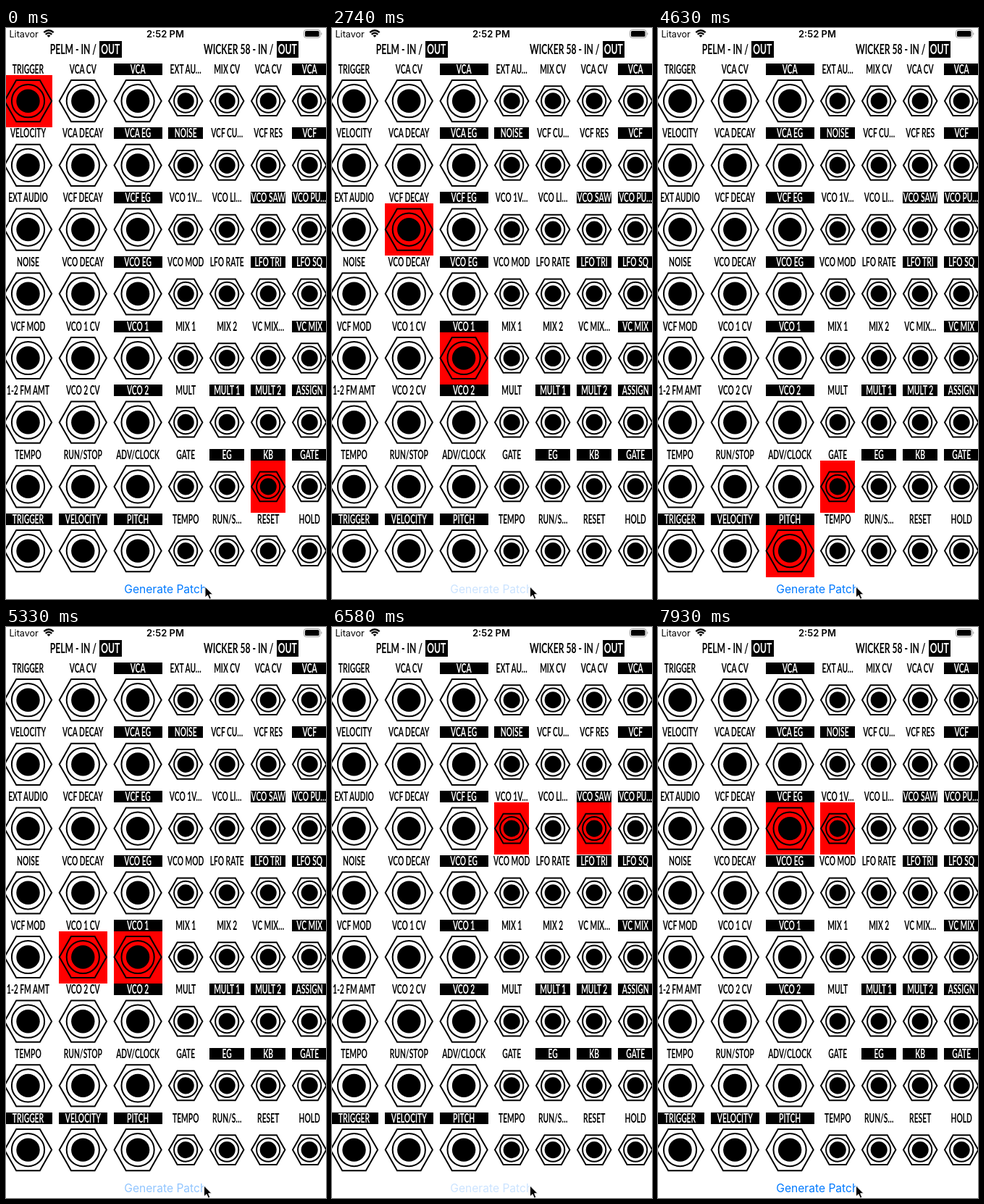
These frames come from a looping animation (442x788 px, 8 s). An HTML page:

```html
<!DOCTYPE html>
<html lang="en">
<head>
<meta charset="utf-8">
<title>Patch generator</title>
<style>
  html, body { margin: 0; width: 100%; height: 100%; overflow: hidden; background: #fff; }
  svg { display: block; width: 100%; height: 100%; }
  .ui { font-family: Inter, Roboto, sans-serif; }
  .label { font: 700 16.6px Lato, "Open Sans", sans-serif; }
  .head { font: 700 19.6px Lato, "Open Sans", sans-serif; }
  .mid { text-anchor: middle; }
  .end { text-anchor: end; }
  .line { fill: none; stroke: #000; stroke-width: 2px; vector-effect: non-scaling-stroke; }
  #panel rect { shape-rendering: crispEdges; }
</style>
</head>
<body>
<svg id="stage" viewBox="0 0 442 788">
  <defs>
    <g id="jack">
      <path class="line" d="M-32.6 0L-16.3 -28.6H16.3L32.6 0L16.3 28.6H-16.3Z"/>
      <circle class="line" r="22.6"/>
      <circle r="16.2"/>
    </g>
  </defs>
  <g class="ui">
    <text x="4.5" y="13" font-size="12.6">Litavor</text>
    <text x="220" y="13" font-size="13" font-weight="600" class="mid">2:52 PM</text>
    <g fill="none" stroke="#000" stroke-width="2.3">
      <path d="M52.3 6.2Q59 .2 65.7 6.2M54.7 8.8Q59 5 63.3 8.8"/>
      <path d="M59 13L56.6 10.4Q59 8.6 61.4 10.4Z" fill="#000" stroke="none"/>
    </g>
    <rect x="411.5" y="2.5" width="22.5" height="11" rx="3" fill="none" stroke="#999"/>
    <rect x="413" y="4" width="19.5" height="8" rx="1.6"/>
    <path d="M435.3 6Q437.6 8 435.3 10Z" fill="#999"/>
  </g>
  <g id="panel"></g>
  <text id="button" class="ui" x="163.3" y="780" font-size="15.6" fill="#007aff">Generate Patch</text>
  <path id="cursor" d="M0 0V15L3.5 11.8L5.9 17.2L8.4 16.1L6.1 10.8H10.7Z" stroke="#fff" stroke-width="1"/>
</svg>
<script>
const LOOP = 8000, CONDENSE = 0.62, TOP = 64.7, ROW = 88.7;

// A leading * marks an output
const rows = [
  "TRIGGER|VCA CV|*VCA|EXT AU…|MIX CV|VCA CV|*VCA",
  "VELOCITY|VCA DECAY|*VCA EG|*NOISE|VCF CU…|VCF RES|*VCF",
  "EXT AUDIO|VCF DECAY|*VCF EG|VCO 1V…|VCO LI…|*VCO SAW|*VCO PU…",
  "NOISE|VCO DECAY|*VCO EG|VCO MOD|LFO RATE|*LFO TRI|*LFO SQ",
  "VCF MOD|VCO 1 CV|*VCO 1|MIX 1|MIX 2|VC MIX…|*VC MIX",
  "1-2 FM AMT|VCO 2 CV|*VCO 2|MULT|*MULT 1|*MULT 2|*ASSIGN",
  "TEMPO|RUN/STOP|ADV/CLOCK|GATE|*EG|*KB|*GATE",
  "*TRIGGER|*VELOCITY|*PITCH|TEMPO|RUN/S…|RESET|HOLD"
];

// press time, release time, the two jacks lit on release (row, column)
const clicks = [
  [510, 930, "01", "66"],
  [1620, 1860, "10", "12"],
  [2510, 2740, "21", "42"],
  [3280, 3580, "00", "02"],
  [4100, 4330, "63", "72"],
  [4920, 5220, "41", "42"],
  [5750, 5990, "23", "25"],
  [6580, 6880, "12", "63"],
  [7460, 7640, "22", "23"]
];
const startPair = ["00", "65"];

const $ = id => document.getElementById(id);

function text(str, x, y, cls, fill = "#000") {
  return `<text class="${cls}" fill="${fill}" transform="translate(${x} ${y}) scale(${CONDENSE} 1)">${str}</text>`;
}

function box(x, y, w, h, attrs = "") {
  return `<rect x="${x}" y="${y}" width="${w}" height="${h}" ${attrs}/>`;
}

function cell(name, r, c) {
  const big = c < 3;
  const w = big ? 67 : 48;
  const x = big ? -3 + 75.8 * c : 224.2 + 57 * (c - 3);
  const y = TOP + ROW * r, mid = x + w / 2;
  const out = name[0] === "*";
  return (out ? box(x, y - 16, w, 16) : "")
    + text(out ? name.slice(1) : name, mid, y - 2, "label mid", out ? "#fff" : "#000")
    + box(x, y, w, 72, `id="lit${r}${c}" fill="#f00" visibility="hidden"`)
    + `<use href="#jack" transform="translate(${mid} ${y + 36}) scale(${big ? 1 : 0.712})"/>`;
}

function heading(name, x) {
  return text(name + " - IN /", x, 36.3, "head end")
    + box(x + 4, 18, 30.5, 23)
    + text("OUT", x + 19.2, 36.3, "head mid", "#fff");
}

$("panel").innerHTML = heading("PELM", 125) + heading("WICKER 58", 369.5)
  + rows.map((line, r) => line.split("|").map((name, c) => cell(name, r, c)).join("")).join("");

let lit = [];
function light(pair) {
  if (pair.join() === lit.join()) return;
  lit.forEach(id => $("lit" + id).setAttribute("visibility", "hidden"));
  pair.forEach(id => $("lit" + id).setAttribute("visibility", "visible"));
  lit = pair;
}

function draw(t) {
  let pair = startPair, alpha = 1;
  for (const [press, release, a, b] of clicks) {
    if (t < press) break;
    if (t >= release) pair = [a, b];
    const fade = (t - release - 40) / 250;
    alpha = 0.2 + 0.8 * Math.min(1, Math.max(0, fade));
  }
  light(pair);
  $("button").setAttribute("opacity", alpha);
  $("cursor").setAttribute("transform", t < 390 ? "translate(275 771)" : "translate(273.5 771)");
}

function tick() {
  draw(performance.now() % LOOP);
  requestAnimationFrame(tick);
}
tick();
</script>
</body>
</html>
```
